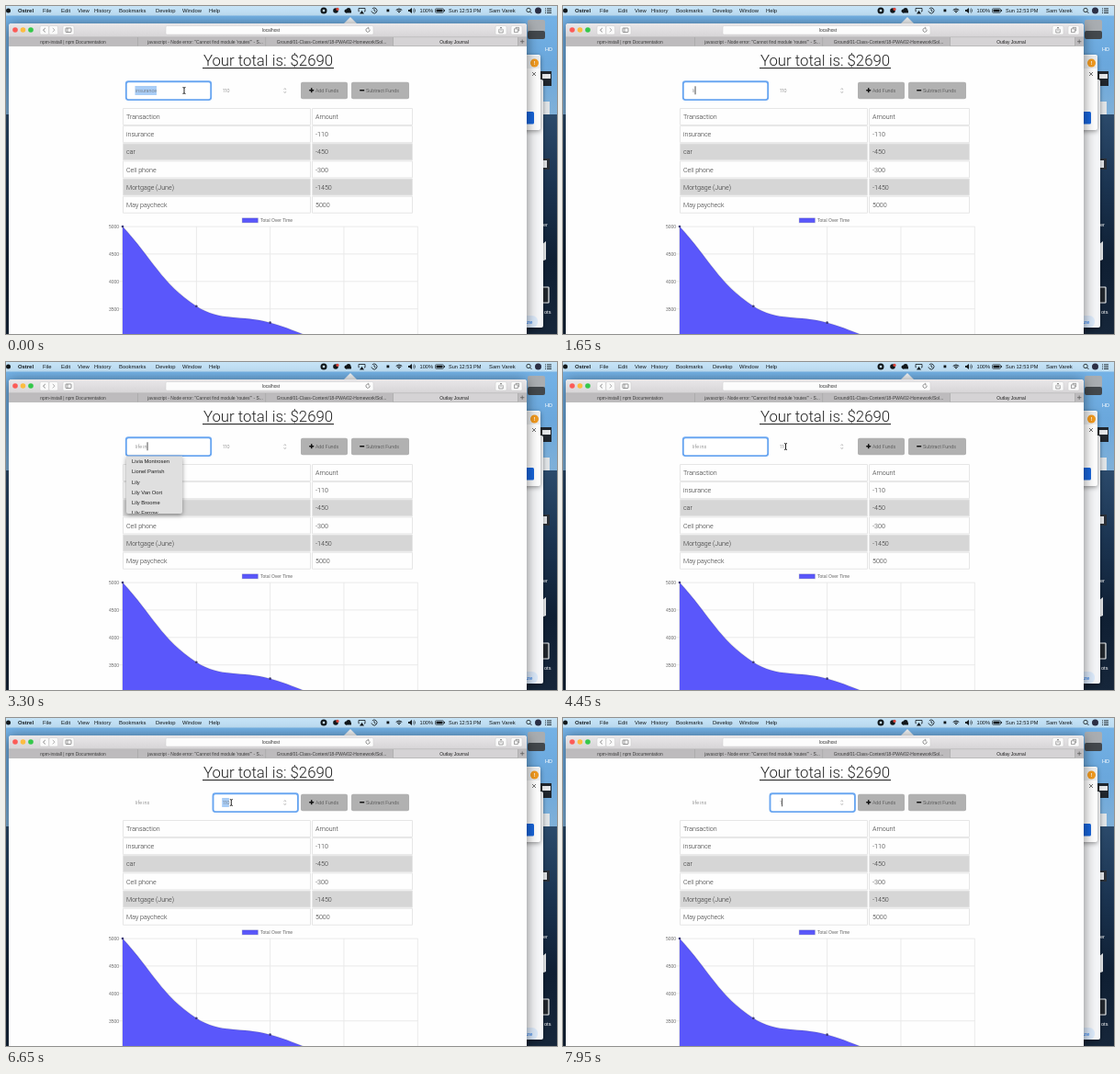
Animation of 600 by 357 pixels, one loop 8 s. Source, as an HTML page with a canvas:

```html
<!DOCTYPE html>
<html lang="en">
<head>
<meta charset="utf-8">
<title>Outlay Journal</title>
<style>
html, body { margin: 0; width: 100%; height: 100%; overflow: hidden; background: #fefefe; }
canvas { display: block; width: 100%; height: 100%; }
</style>
</head>
<body>
<canvas id="stage" width="600" height="357"></canvas>
<script>
const ctx = document.getElementById('stage').getContext('2d');
const W = 600, H = 357, LOOP = 8000;
const UI = '"Liberation Sans", Arial, sans-serif';
const THIN = 'Roboto, "Open Sans", sans-serif';
const BLUE = '#5a57fb';
const HORIZON = 118;

// Typed values: [start, text]
const nameKeys = [[0, 'insurance'], [1450, 'l'], [1600, 'li'], [2150, 'lif'], [2350, 'life'],
  [2600, 'life '], [2900, 'life i'], [3150, 'life in'], [3500, 'life ins']];
const amountKeys = [[0, '110'], [7650, '1']];
const FOCUS = 4900, SELECT = 5050;
const MENU_ON = 2500, MENU_OFF = 3700;
const people = ['Livia Montrosen', 'Lionel Parrish', 'Lily', 'Lily Van Oort', 'Lily Broome', 'Lily Farrow'];
const rows = [['Transaction', 'Amount'], ['insurance', '-110'], ['car', '-450'],
  ['Cell phone', '-300'], ['Mortgage (June)', '-1450'], ['May paycheck', '5000']];
const totals = [5000, 3550, 3250, 2800, 2690];

function rect(x, y, w, h, color) {
  ctx.fillStyle = color;
  ctx.fillRect(x, y, w, h);
}

function box(x, y, w, h, r, fill, stroke, line = 1) {
  ctx.beginPath();
  ctx.roundRect(x, y, w, h, r);
  if (fill) { ctx.fillStyle = fill; ctx.fill(); }
  if (stroke) { ctx.strokeStyle = stroke; ctx.lineWidth = line; ctx.stroke(); }
}

function shadowBox(blur, alpha, ...args) {
  ctx.save();
  ctx.shadowColor = `rgba(0,0,0,${alpha})`;
  ctx.shadowBlur = blur;
  ctx.shadowOffsetY = 1.5;
  box(...args);
  ctx.restore();
}

function disc(x, y, r, color) {
  ctx.beginPath();
  ctx.arc(x, y, r, 0, Math.PI * 2);
  ctx.fillStyle = color;
  ctx.fill();
}

function path(points, color, line = 0.8) {
  ctx.beginPath();
  points.forEach(([x, y]) => ctx.lineTo(x, y));
  ctx.strokeStyle = color;
  ctx.lineWidth = line;
  ctx.stroke();
}

function arc(x, y, r, from, to, color, line = 0.8) {
  ctx.beginPath();
  ctx.arc(x, y, r, from, to);
  ctx.strokeStyle = color;
  ctx.lineWidth = line;
  ctx.stroke();
}

function poly(points, color) {
  ctx.beginPath();
  points.forEach(([x, y]) => ctx.lineTo(x, y));
  ctx.fillStyle = color;
  ctx.fill();
}

function text(str, x, y, size, color, { font = UI, weight = 400, align = 'left' } = {}) {
  ctx.font = `${weight} ${size}px ${font}`;
  ctx.textAlign = align;
  ctx.fillStyle = color;
  ctx.fillText(str, x, y);
}

function thin(str, x, y, size, color, align = 'left') {
  text(str, x, y, size, color, { font: THIN, weight: 300, align });
}

function gradient(y0, y1, ...colors) {
  const g = ctx.createLinearGradient(0, y0, 0, y1);
  colors.forEach((c, i) => g.addColorStop(i / (colors.length - 1), c));
  return g;
}

function drawDesktop() {
  rect(0, 0, W, HORIZON, gradient(10, HORIZON, '#74b2e6', '#6aa7dc', '#7fb0d8'));
  rect(0, HORIZON, W, H - HORIZON, gradient(HORIZON, H, '#2b4a6b', '#1a3350', '#0f1f33', '#16263a'));
  poly([[368, 19], [375, 12], [382, 19]], '#f4f6f7');
  // Drive icon and files
  box(568, 15, 19, 13, 2, '#a9adb1');
  box(568, 27, 19, 9, 2, '#43484d');
  text('HD', 587, 49, 5.6, '#fff');
  rect(582, 71, 12, 16, '#20262d');
  rect(584, 74, 9, 5, '#e4e6e8');
  rect(582, 104, 10, 14, '#dfe3e6');
  rect(584, 166, 8, 12, '#2a2f36');
  rect(585, 168, 4, 8, '#e4e6e8');
  text('er', 585, 240, 5.6, '#fff');
  poly([[583, 260], [588, 256], [588, 276], [583, 278]], '#e8eaec');
  box(582, 306, 9, 17, 0.5, '#22272d', '#eceeef', 1.2);
  text('ots', 586, 335, 5.6, '#fff');
  // Windows peeking out behind the browser
  shadowBox(4, 0.35, 550, 80, 35, 270, 2, '#f5f6f8');
  shadowBox(5, 0.4, 550, 53, 32, 82, 2, '#fff');
  rect(550, 54, 32, 14, '#eceef0');
  disc(575.5, 62, 4.5, '#f29a1f');
  text('!', 575.5, 64, 5.5, '#fff', { weight: 700, align: 'center' });
  path([[573, 72], [577, 76]], '#555');
  path([[577, 72], [573, 76]], '#555');
  box(560, 115, 15, 13.5, 1.5, '#1765dc');
  box(556, 337, 23, 13, 6, '#dceafb');
  text('ze', 567, 346, 6, '#1a73e8');
}

function drawMenuBar() {
  rect(0, 0, W, 10.5, gradient(0, 10, '#c6e3f6', '#bcdcf2'));
  const ink = '#10161a';
  disc(2.5, 5, 2.5, ink);
  text('Ostrel', 13, 7.2, 5.9, ink, { weight: 700 });
  [['File', 40], ['Edit', 60], ['View', 78], ['History', 96], ['Bookmarks', 123],
    ['Develop', 163], ['Window', 192], ['Help', 221]]
    .forEach(([s, x]) => text(s, x, 7.2, 5.9, ink));
  disc(346, 5, 3.5, ink);
  rect(344.8, 3.8, 2.4, 2.4, '#c6e3f6');
  disc(359, 5, 2.8, ink);
  disc(361, 3.4, 1.6, '#d9433a');
  disc(370.5, 5.5, 2, ink);
  disc(373, 4.5, 2.5, ink);
  rect(370, 5, 6, 2.5, ink);
  path([[384.5, 6], [384, 6], [384, 2.5], [391, 2.5], [391, 6], [390, 6]], ink);
  poly([[385, 8.5], [387.5, 5], [390, 8.5]], ink);
  arc(401, 5, 3, -2.4, 3, ink);
  path([[401, 3], [401, 5.2], [402.5, 6]], ink);
  rect(414.5, 3.5, 2.8, 2.8, ink);
  [1.5, 3.2, 4.9].forEach(r => arc(428, 8, r, -2.3, -0.85, ink, 1));
  poly([[438, 4], [439.5, 4], [442, 2], [442, 8], [439.5, 6], [438, 6]], ink);
  [2, 3.5].forEach(r => arc(442, 5, r, -0.8, 0.8, ink, 0.6));
  text('100%', 450.5, 7.2, 5.7, ink);
  box(467.5, 2.8, 9, 4.5, 1, null, ink, 0.6);
  rect(468.5, 3.7, 7, 2.7, ink);
  rect(477, 4.2, 1, 1.6, ink);
  text('Sun 12:53 PM', 482, 7.2, 5.6, ink);
  text('Sam Varek', 526, 7.2, 5.9, ink);
  arc(569, 4.5, 2.2, 0, 7, ink);
  path([[570.6, 6], [572.5, 8]], ink);
  disc(579.5, 5, 3.5, '#2b2f45');
  for (let i = 0; i < 3; i++) {
    rect(587, 2.5 + i * 2.2, 1, 0.9, ink);
    rect(589, 2.5 + i * 2.2, 5, 0.9, ink);
  }
}

function drawBrowser() {
  shadowBox(14, 0.5, 3, 19, 564, 345, 3, '#fefefe');
  box(3, 19, 564, 15, [3, 3, 0, 0], gradient(19, 34, '#e9e7e9', '#d6d4d6'));
  ['#fc5b57', '#fdbc40', '#34c84a'].forEach((c, i) => disc(10 + i * 8.5, 26, 2.8, c));
  const line = '#696969';
  [[37, 9.5], [47, 9.5], [62, 12], [533, 12], [550, 12]]
    .forEach(([x, w]) => box(x, 21.5, w, 9.5, 1.5, '#fafafa', '#cbcbcb', 0.5));
  path([[42.8, 24], [40.5, 26.2], [42.8, 28.4]], line);
  path([[50.8, 24], [53, 26.2], [50.8, 28.4]], '#999');
  box(65, 24, 6, 4.5, 0.5, null, line, 0.7);
  path([[67, 24], [67, 28.5]], line, 0.6);
  box(174, 21.5, 226, 9.5, 1.5, '#fcfcfc', '#cfcfcf', 0.5);
  text('localhost', 288.5, 28, 4.9, '#333', { align: 'center' });
  arc(394, 26.2, 2.1, -0.4, 5, line, 0.7);
  path([[394, 22.9], [395.4, 24.2], [394, 25.2]], line, 0.6);
  path([[537.4, 25.5], [536.8, 25.5], [536.8, 29], [541.2, 29], [541.2, 25.5], [540.6, 25.5]], line, 0.6);
  path([[537.8, 24.2], [539, 23], [540.2, 24.2]], line, 0.6);
  path([[539, 23], [539, 27.2]], line, 0.6);
  box(553.5, 24.8, 3.8, 3.8, 0, null, line, 0.6);
  path([[555, 24.2], [555, 23.4], [558.6, 23.4], [558.6, 27], [557.8, 27]], line, 0.6);

  rect(3, 34, 564, 9.5, '#bdbbbd');
  rect(421.5, 34, 136, 9.5, '#d5d3d5');
  rect(3, 33.6, 564, 0.5, '#aaa');
  rect(3, 43, 564, 0.6, '#a8a8a8');
  [143, 282.5, 421, 557].forEach(x => rect(x, 34, 0.6, 9.5, '#a2a2a2'));
  path([[560, 38.7], [564.4, 38.7]], '#555', 0.7);
  path([[562.2, 36.5], [562.2, 40.9]], '#555', 0.7);
  [['npm-install | npm Documentation', 73],
    ['javascript - Node error: "Cannot find module \'routes\'" - S...', 217],
    ['Ground/01-Class-Content/18-PWA/02-Homework/Sol...', 354.5],
    ['Outlay Journal', 488]]
    .forEach(([s, x], i) => text(s, x, 40.5, 4.9, i < 3 ? '#3a3a3a' : '#1a1a1a', { align: 'center' }));
}

function drawTable() {
  rows.forEach(([label, amount], i) => {
    const y = 111.5 + i * 19.15;
    const fill = i === 2 || i === 4 ? '#d6d6d6' : '#fefefe';
    box(127.5, y, 204, 18, 0, fill, '#e6e6e6');
    box(333.5, y, 109, 18, 0, fill, '#e6e6e6');
    thin(label, 131, y + 11.6, 7.1, '#303030');
    thin(amount, 337, y + 11.6, 7.1, '#303030');
  });
}

// Bezier handles of a cardinal-like spline with tension 0.4
function handles(prev, cur, next) {
  const a = Math.hypot(cur.x - prev.x, cur.y - prev.y);
  const b = Math.hypot(next.x - cur.x, next.y - cur.y);
  const at = k => ({ x: cur.x + k * (next.x - prev.x), y: cur.y + k * (next.y - prev.y) });
  return { before: at(-0.4 * a / (a + b)), after: at(0.4 * b / (a + b)) };
}

function drawChart() {
  const edge = 'rgba(0,0,0,.1)';
  box(257.2, 230.8, 17.2, 5, 0, BLUE, edge, 1.2);
  text('Total Over Time', 277, 235.2, 5, '#666');
  for (let i = 0; i < 4; i++) {
    const y = 240 + i * 29.9;
    rect(123, y - 0.4, 325.5, 0.9, '#e8e8e8');
    text(5000 - i * 500, 123, y + 1.9, 5, '#666', { align: 'right' });
  }
  for (let i = 0; i < 5; i++) rect(126.6 + i * 80.3, 240, 0.9, 117, i ? '#e8e8e8' : '#bdbdbd');

  const pts = totals.map((v, i) => ({ x: 127 + i * 80.3, y: 240 + (5000 - v) * 0.0598 }));
  const hs = pts.map((p, i) => handles(pts[i - 1] || p, p, pts[i + 1] || p));
  const curve = new Path2D();
  curve.moveTo(pts[0].x, pts[0].y);
  for (let i = 1; i < pts.length; i++) {
    const a = hs[i - 1].after, b = hs[i].before;
    curve.bezierCurveTo(a.x, a.y, b.x, b.y, pts[i].x, pts[i].y);
  }
  const area = new Path2D(curve);
  area.lineTo(pts[4].x, 420);
  area.lineTo(pts[0].x, 420);
  ctx.fillStyle = BLUE;
  ctx.fill(area);
  ctx.strokeStyle = edge;
  ctx.lineWidth = 1.3;
  ctx.stroke(curve);
  pts.forEach(p => disc(p.x, p.y, 1.3, '#3d3b78'));
}

function drawButton(x, w, label, labelX, plus) {
  box(x, 82.8, w, 18.4, 2, '#b1b1b1');
  const icon = labelX - 6.8;
  rect(icon, 91, 5, 1.5, '#111');
  if (plus) rect(icon + 1.75, 89.2, 1.5, 5, '#111');
  thin(label, labelX, 94, 5.4, '#3c3c3c');
}

function drawField(x, keys, t, focused, selected) {
  const [since, value] = keys.filter(k => k[0] <= t).pop();
  if (focused) box(x - 0.2, 82.3, 92.4, 19.8, 2.5, '#fff', '#69a6f1', 1.9);
  const left = x + 10;
  ctx.font = `300 5.4px ${THIN}`;
  const width = ctx.measureText(value).width;
  if (selected) rect(left - 0.5, 87, width + 0.5, 10, '#a9cdf6');
  thin(value, left, 94, 5.4, '#666');
  const blinkOn = Math.floor((t - since) / 500) % 2 === 0;
  if (focused && !selected && blinkOn) rect(left + width + 0.2, 87.3, 0.8, 9, '#222');
}

function drawForm(t) {
  drawField(131, nameKeys, t, t < FOCUS, t < 1450);
  ctx.letterSpacing = '-0.6px';
  drawField(225.7, amountKeys, t, t >= FOCUS, t >= SELECT && t < 7650);
  ctx.letterSpacing = '0px';
  path([[302.5, 91.2], [303.8, 89.5], [305.1, 91.2]], '#aaa', 0.7);
  path([[302.5, 93], [303.8, 94.7], [305.1, 93]], '#aaa', 0.7);
  drawButton(321, 51, 'Add Funds', 337, true);
  drawButton(376, 63, 'Subtract Funds', 392, false);
}

function drawSuggestions() {
  shadowBox(5, 0.4, 131, 102.5, 61, 62.5, [0, 0, 2, 2], '#dfdfdf');
  ctx.save();
  ctx.beginPath();
  ctx.rect(131, 102.5, 61, 62.5);
  ctx.clip();
  people.forEach((s, i) => text(s, 137, 110.2 + i * 11.2, 5.8, '#1d1d1d'));
  ctx.restore();
}

function ease(t, from, to) {
  const k = Math.min(1, Math.max(0, (t - from) / (to - from)));
  return k * k * (3 - 2 * k);
}

function drawPointer(t) {
  if (t >= 1450 && t < 3950 || t >= 7650) return;
  const x = 194 + 48.5 * ease(t, 3950, 4400) + 2.8 * ease(t, 4550, 4850);
  const y = 92;
  const beam = (color, line) => {
    path([[x - 1.5, y - 3.5], [x, y - 3], [x + 1.5, y - 3.5]], color, line);
    path([[x, y - 3], [x, y + 3]], color, line);
    path([[x - 1.5, y + 3.5], [x, y + 3], [x + 1.5, y + 3.5]], color, line);
  };
  beam('#fff', 2);
  beam('#111', 0.9);
}

function draw(t) {
  drawDesktop();
  drawMenuBar();
  drawBrowser();
  thin('Your total is: $2690', 285.5, 64.8, 16.8, '#222', 'center');
  rect(214, 67, 143, 1.1, '#2a2a2a');
  drawForm(t);
  drawTable();
  drawChart();
  if (t >= MENU_ON && t < MENU_OFF) drawSuggestions();
  drawPointer(t);
}

const start = performance.now();
function tick() {
  draw((performance.now() - start) % LOOP);
  requestAnimationFrame(tick);
}
tick();
</script>
</body>
</html>
```
